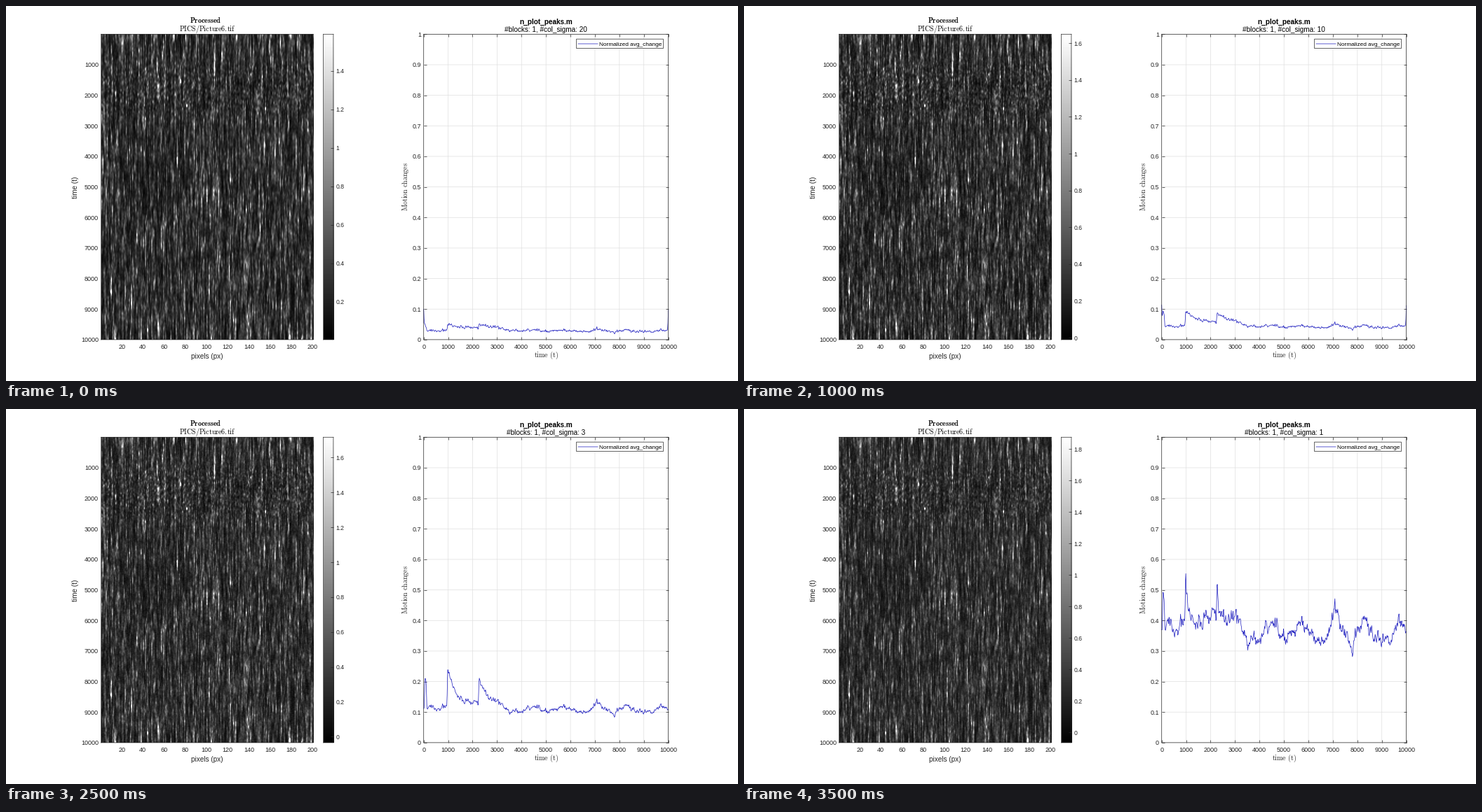
Animation, 1044 px wide and 536 px high, one loop 4000 ms. Source, as a matplotlib script:

```python
import numpy as np
import matplotlib.pyplot as plt
from matplotlib.animation import FuncAnimation
from matplotlib.patches import Rectangle
from matplotlib.ticker import FuncFormatter, MultipleLocator

WIDTH, HEIGHT, DPI = 1044, 536, 64
PT = 72 / DPI  # points per pixel
HAIRLINE = 0.7 * PT
INK = "#262626"
BLUE = "#1a1abe"
SIGMAS = [20, 15, 10, 5, 4, 3, 2, 1]
ROWS, COLS, SPAN = 874, 200, 10000

plt.rcParams.update({
    "font.family": "Liberation Sans",
    "mathtext.fontset": "cm",
    "axes.linewidth": HAIRLINE,
    "axes.edgecolor": INK,
    "path.snap": False,
})
rng = np.random.default_rng(6)


def smooth(field, sigma):
    """Gaussian blur along the first axis."""
    reach = int(np.ceil(3 * sigma))
    offsets = np.arange(-reach, reach + 1)
    kernel = np.exp(-0.5 * (offsets / sigma) ** 2)
    kernel /= kernel.sum()
    padded = np.pad(field, ((reach, reach), (0, 0)), mode="reflect")
    return sum(k * padded[i:i + len(field)] for i, k in enumerate(kernel))


def smooth_noise(sigma, rows=ROWS, cols=COLS):
    field = smooth(rng.standard_normal((rows, cols)), sigma)
    return field / field.std()


def make_motion():
    """Vertical streaks of mixed length, finer in the early part."""
    time = np.linspace(0, SPAN, ROWS)[:, None]
    col = np.arange(COLS)[None, :]
    fine = 0.35 + 0.35 * np.exp(-((time - 1800) / 900) ** 4)
    streaks = (fine * smooth_noise(2.5) + (1 - fine) * smooth_noise(9)
               + 0.65 * smooth_noise(28))
    patches = (0.4 * np.exp(-((col - 97) / 12) ** 2 - ((time - 5300) / 600) ** 2)
               - 0.4 * np.exp(-((col - 55) / 20) ** 2 - ((time - 5000) / 900) ** 2))
    grain = 0.04 * rng.standard_normal((ROWS, COLS))
    return 0.28 * np.exp(0.62 * streaks + patches) + grain


motion = make_motion()
images = [smooth(motion, sigma * ROWS / SPAN) for sigma in SIGMAS]

times = np.linspace(0, SPAN, 700)
early_rise = 0.05 * np.exp(-((times - 1900) / 1150) ** 6)
swing = 0.035 * np.clip((times - 2500) / 1000, 0, 1) * np.cos(2 * np.pi * (times - 4520) / 1300)
ripple = 0.016 * smooth_noise(4, len(times), 1)[:, 0]
drift = (0.365 + early_rise + swing + ripple) / 0.37
jitter = smooth_noise(0.7, len(times), 1)[:, 0]


def pulse(start, decay):
    rise = np.clip((times - start + 30) / 30, 0, 1)
    return rise * np.exp(-np.maximum(times - start, 0) / decay)


def curve(sigma):
    level = 0.015 + 0.28 / sigma + 0.075 / sigma ** 3
    opening = 0.145 * np.exp(-sigma / 8.5)
    jump = 0.17 / (1 + (sigma / 5) ** 1.5)
    decay = 50 + 280 * np.log(sigma)
    edge = 0.07 * np.clip((sigma - 4) / 6, 0, 1)
    y = level * drift * (1 + (0.025 + 0.0025 * sigma) * jitter)
    y += opening * np.exp(-((times - 75) / 45) ** 4)
    y += jump * (pulse(980, decay) + 0.7 * pulse(2265, decay))
    return y + edge * (np.exp(-times / 25) + np.exp((times - SPAN) / 15))


def color_limits(sigma):
    low = np.interp(np.log(sigma), np.log([1, 4, 20]), [-0.064, -0.027, 0.003])
    high = 1.64 + 0.235 / sigma - 0.00015 * sigma ** 2
    return low, high


fig = plt.figure(figsize=(WIDTH / DPI, HEIGHT / DPI), dpi=DPI, facecolor="white")


def add_axes(left, right, top=40.3, bottom=476.9):
    return fig.add_axes([left / WIDTH, 1 - bottom / HEIGHT,
                         (right - left) / WIDTH, (bottom - top) / HEIGHT])


def style_ticks(ax, size=9, length=4, **kwargs):
    ax.tick_params(direction="in", length=length * PT, width=HAIRLINE, color=INK,
                   labelsize=size * PT, labelcolor=INK, **kwargs)
    ax.tick_params(axis="x", pad=6.2 * PT)
    ax.tick_params(axis="y", pad=3.7 * PT)


map_ax = add_axes(135.6, 437.9)
map_image = map_ax.imshow(images[0], cmap="gray", aspect="auto",
                          extent=(0.5, COLS + 0.5, SPAN, 0))
map_ax.set_xticks(range(20, 201, 20))
map_ax.set_yticks(range(1000, 10001, 1000))
style_ticks(map_ax, length=0)

bar_ax = add_axes(452.6, 466.9)
bar_image = bar_ax.imshow(np.linspace(0, 1, 256)[:, None], cmap="gray",
                          aspect="auto", origin="lower")
bar_ax.set_xticks([])
bar_ax.yaxis.tick_right()
bar_ax.yaxis.set_major_locator(MultipleLocator(0.2))
bar_ax.yaxis.set_major_formatter(FuncFormatter(lambda v, _: f"{round(v, 1) + 0:g}"))
style_ticks(bar_ax, size=8.6)

plot_ax = add_axes(595.7, 944.6)
plot_ax.set(xlim=(0, SPAN), ylim=(0, 1))
plot_ax.set_xticks(range(0, 10001, 1000))
plot_ax.set_yticks(np.arange(11) / 10)
plot_ax.yaxis.set_major_formatter(FuncFormatter(lambda v, _: f"{v:g}"))
plot_ax.grid(color="#dfdfdf", linewidth=HAIRLINE)
plot_ax.set_axisbelow(True)
style_ticks(plot_ax, top=True, right=True)
line, = plot_ax.plot([], [], color=BLUE, linewidth=HAIRLINE, clip_on=False)

# pixel-space layer for titles, axis labels and the legend
stage = fig.add_axes([0, 0, 1, 1])
stage.set(xlim=(0, WIDTH), ylim=(HEIGHT, 0))
stage.set_axis_off()


def label(x, y, text, size=10, color=INK, ha="center", va="baseline", **kwargs):
    return stage.text(x, y, text, fontsize=size * PT, color=color, ha=ha, va=va, **kwargs)


label(285, 24, r"$\mathbf{Processed}$", color="black")
label(287.5, 36.3, r"$\mathrm{PICS/Picture6.\!tif}$", color="black")
label(287, 503.5, "pixels (px)")
label(98.5, 259, "time (t)", va="center", rotation=90)
label(770, 26, "n_plot_peaks.m", color="black", weight="bold")
subtitle = label(770, 37, "", color="black")
label(770, 502, r"$\mathrm{time\ (t)}$")
label(570, 258, r"$\mathrm{Motion\ changes}$", va="center", rotation=90)

stage.add_patch(Rectangle((813.6, 47.2), 123.8, 13.4, facecolor="white",
                          edgecolor=INK, linewidth=HAIRLINE))
stage.plot([816, 844], [54, 54], color=BLUE, linewidth=HAIRLINE)
label(845.5, 57.2, "Normalized avg_change", 8.25, "black", ha="left")


def update(index):
    sigma = SIGMAS[index]
    low, high = color_limits(sigma)
    map_image.set_data(images[index])
    map_image.set_clim(low, high)
    bar_image.set_extent((0, 1, low, high))
    bar_ax.set_ylim(low, high)
    line.set_data(times, curve(sigma))
    subtitle.set_text(f"#blocks: 1, #col_sigma: {sigma}")
    return map_image, bar_image, line, subtitle


animation = FuncAnimation(fig, update, frames=len(SIGMAS), interval=500,
                          repeat=True, repeat_delay=0, blit=False)
plt.show()
```
